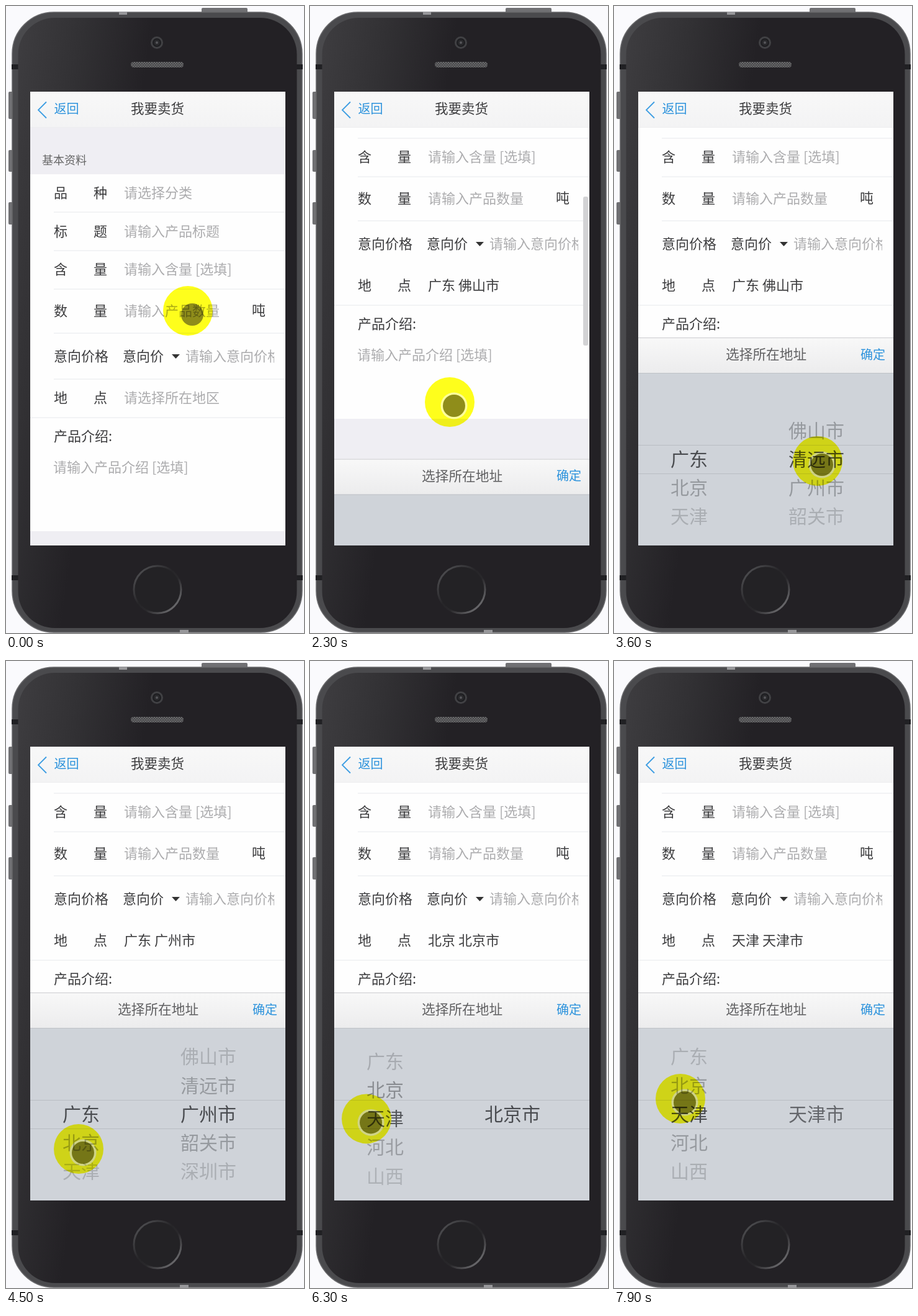
Write an HTML page that moves like this. It is 480 by 1010 pixels and loops after 8000 ms.

```html
<!DOCTYPE html>
<html lang="zh-CN">
<head>
<meta charset="utf-8">
<title>我要卖货</title>
<style>
html, body { margin: 0; width: 100%; height: 100%; overflow: hidden; background: #fafafd; }
svg { display: block; width: 480px; height: 1010px; }
text { font: 300 22px "Noto Sans CJK SC", "Noto Sans CJK", sans-serif; fill: #3c3c3e; white-space: pre; }
.hint { fill: #acacae; }
.blue { fill: #2b92dc; }
.rule { stroke: #e6e8ec; }
#wheels text { fill: #4a4c50; }
#touch { mix-blend-mode: multiply; }
</style>
</head>
<body>
<svg viewBox="0 0 480 1010">
  <defs>
    <linearGradient id="body" x1="0" y1="0.06" x2="0.42" y2="0.2">
      <stop offset="0" stop-color="#3d3c3f"/><stop offset="0.45" stop-color="#323134"/><stop offset="1" stop-color="#232125"/>
    </linearGradient>
    <linearGradient id="nav" x2="0" y2="1">
      <stop offset="0" stop-color="#f8f8f8"/><stop offset="1" stop-color="#f3f3f4"/>
    </linearGradient>
    <linearGradient id="bar" x2="0" y2="1">
      <stop offset="0" stop-color="#f8f8f8"/><stop offset="1" stop-color="#ececed"/>
    </linearGradient>
    <linearGradient id="home" x2="1" y2="1">
      <stop offset="0" stop-color="#59595c"/><stop offset="0.45" stop-color="#262528"/>
      <stop offset="0.6" stop-color="#29282b"/><stop offset="1" stop-color="#88888b"/>
    </linearGradient>
    <pattern id="mesh" width="4" height="4" patternUnits="userSpaceOnUse">
      <path fill="#6a6a6c" d="M0 0h2v2H0zM2 2h2v2H2z"/>
    </pattern>
    <clipPath id="page"><path d="M39 196H450V869H39z"/></clipPath>
    <clipPath id="screen"><path d="M39 138H450V869H39z"/></clipPath>
    <clipPath id="field"><path d="M288 540H432V590H288z"/></clipPath>
    <clipPath id="drum"><path d="M39 592H450V869H39z"/></clipPath>
  </defs>

  <!-- phone -->
  <g fill="#707073">
    <rect x="315" y="3" width="74" height="10" rx="2"/>
    <rect x="4" y="138" width="8" height="44" rx="2"/>
    <rect x="4" y="232" width="8" height="35" rx="2"/>
    <rect x="4" y="316" width="8" height="36" rx="2"/>
  </g>
  <rect x="10" y="10" width="467" height="999" rx="67" fill="#4a4a4d" stroke="#68686b" stroke-width="1.5"/>
  <path fill="#202023" d="M9 94h11v8H9zM467 94h11v8h-11zM9 917h11v8H9zM467 917h11v8h-11z"/>
  <path fill="#98989b" d="M182 9h13v5h-13zM280 1005h14v5h-14z"/>
  <rect x="19.500" y="19" width="449" height="983" rx="59" fill="url(#body)"/>
  <circle cx="243" cy="59" r="10" fill="#414144"/>
  <circle cx="243" cy="59" r="6" fill="#29292c" stroke="#1d1d20" stroke-width="2"/>
  <circle cx="243" cy="59" r="2" fill="#57575b"/>
  <rect x="201" y="90" width="85" height="9" rx="4.500" fill="#454547"/>
  <rect x="201" y="90" width="85" height="9" rx="4.500" fill="url(#mesh)"/>
  <circle cx="244" cy="940" r="38" fill="#232225" stroke="url(#home)" stroke-width="3"/>

  <!-- form page -->
  <path fill="#fff" d="M39 138H450V869H39z"/>
  <g clip-path="url(#page)">
    <g id="form">
      <path fill="#efeef3" d="M39 196H450V271H39zM39 846H450V1060H39z"/>
      <path fill="#fefefe" d="M39 271H450V846H39z"/>
      <path class="rule" d="M77 332H450M77 394H450M77 456H450M77 527H450M39 663H450"/>
      <path class="rule" id="priceRule" d="M77 601H450"/>
      <path fill="#333" d="M267 561h13l-6.500 7z"/>
      <g id="copy"></g>
      <g clip-path="url(#field)" id="price"></g>
    </g>
    <rect id="scroll" x="440" y="307" width="8" height="240" rx="3" fill="#d3d3d5"/>
  </g>
  <path fill="url(#nav)" d="M39 138H450V196H39z"/>
  <path stroke="#ededef" d="M39 195.500H450"/>
  <path fill="none" stroke="#3c9de2" stroke-width="1.800" d="M65 154.500 52 167.500 65 180.500"/>
  <g id="title"></g>

  <!-- picker -->
  <g clip-path="url(#screen)">
    <g id="picker">
      <path fill="#cfd3d9" d="M39 591H450V872H39z"/>
      <path fill="url(#bar)" d="M39 534H450V591H39z"/>
      <path stroke="#cbccd0" d="M39 534.500H450"/>
      <path stroke="#bfc2c7" d="M39 591.500H450"/>
      <path stroke="#b9bdc3" d="M39 707.500H450M39 753.500H450"/>
      <g id="head"></g>
      <g clip-path="url(#drum)"><g id="wheels"></g></g>
    </g>
  </g>

  <g id="touch">
    <circle r="40" fill="#ffff1c"/>
    <circle id="ring" cx="7" cy="6" r="21.500" fill="#ffff9c"/>
    <circle cx="7" cy="6" r="18" fill="#908e1a"/>
  </g>
</svg>
<script>
const LOOP = 8000, STEP = 46.3, MID = 729.5;
const $ = id => document.getElementById(id);

// Text is placed by its left edge (or middle) and its vertical centre.
function write(parent, str, x, cy, { size = 22, cls = '', middle = false } = {}) {
  const el = document.createElementNS('http://www.w3.org/2000/svg', 'text');
  el.textContent = str;
  el.setAttribute('x', x);
  el.setAttribute('y', cy + size * 0.38);
  el.setAttribute('class', cls);
  el.style.fontSize = size + 'px';
  if (middle) el.style.textAnchor = 'middle';
  $(parent).append(el);
  return el;
}

const hint = { cls: 'hint' };
write('title', '返回', 77.5, 165, { size: 20, cls: 'blue' });
write('title', '我要卖货', 201, 165, { size: 21.5 });
write('copy', '基本资料', 58, 248, { size: 18 }).style.fill = '#666';
[['品', '种', 301, '请选择分类'], ['标', '题', 363, '请输入产品标题'],
 ['含', '量', 424, '请输入含量 [选填]'], ['数', '量', 491, '请输入产品数量'],
 ['地', '点', 631, '']].forEach(([a, b, y, tip]) => {
  write('copy', a, 77, y);
  write('copy', b, 141, y);
  write('copy', tip, 190, y, hint);
});
write('copy', '吨', 396, 490);
write('copy', '意向价格', 77, 564);
write('copy', '意向价', 188, 564);
write('price', '请输入意向价格', 289, 564, hint);
write('copy', '产品介绍:', 77, 693);
write('copy', '请输入产品介绍 [选填]', 76, 743, hint);
const place = write('copy', '', 190, 631);
write('head', '选择所在地址', 180, 561, { size: 21.7 }).style.fill = '#606062';
write('head', '确定', 397, 561, { size: 20, cls: 'blue' });

const provinces = ['广东', '北京', '天津', '河北', '山西', '内蒙古', '辽宁'];
const cities = [
  ['佛山市', '清远市', '广州市', '韶关市', '深圳市', '珠海市'],
  ['北京市'], ['天津市'], ['石家庄市', '唐山市', '秦皇岛市', '邯郸市']
];
const column = (n, x) => Array.from({ length: n }, () =>
  write('wheels', '', x, MID, { size: 30, middle: true }));
const left = column(provinces.length, 121), right = column(6, 326);

// Keys: [time, value, ...]; each stretch is eased at both ends.
const provinceKeys = [[0, 0], [5000, 0], [5400, 1], [6000, 1], [6400, 2], [6650, 2], [6900, 3], [7580, 3], [7800, 2]];
const cityKeys = [[0, 0], [3350, 0], [3850, 2]];
const touchKeys = [
  [0, 293, 491], [300, 292, 491], [900, 240, 600], [1100, 246, 590], [1500, 231, 560],
  [1800, 222, 642], [1900, 225, 638], [3000, 225, 638], [3350, 326, 778], [3850, 330, 688],
  [4000, 325, 690], [4500, 117, 786], [5000, 117, 786], [5400, 108, 742], [5500, 106, 747],
  [5900, 93, 805], [6350, 91, 735], [6650, 86, 790], [6950, 116, 732], [7100, 116, 737],
  [7550, 106, 662], [7900, 107, 705]
];
// Settled choices: [time, province, city]
const picks = [[2200, 0, 0], [3850, 0, 2], [5400, 1, 0], [6400, 2, 0], [6900, 3, 0], [7800, 2, 0]];

function track(keys, t) {
  const i = keys.findIndex(k => k[0] > t);
  if (i < 0) return keys[keys.length - 1].slice(1);
  const a = keys[i - 1], b = keys[i];
  const p = (t - a[0]) / (b[0] - a[0]), e = p * p * (3 - 2 * p);
  return a.slice(1).map((v, n) => v + (b[n + 1] - v) * e);
}

function spin(nodes, names, pos, alpha = 1) {
  nodes.forEach((el, i) => {
    const d = i - pos, far = Math.abs(d);
    const shade = far < 1 ? 1 - 0.58 * far : Math.max(0, 0.42 - 0.15 * (far - 1));
    el.textContent = names[i] || '';
    el.setAttribute('transform', `translate(0 ${d * STEP})`);
    el.setAttribute('opacity', far > 2.6 ? 0 : shade * alpha);
  });
}

function draw(t) {
  const open = t >= 2200, scrolled = t >= 2300;
  const [x, y] = track(touchKeys, t);
  $('touch').setAttribute('transform', `translate(${x} ${y})`);
  $('ring').setAttribute('opacity', t < 300 ? 0 : 1);
  $('form').setAttribute('transform', `translate(0 ${scrolled ? -181 : 0})`);
  $('priceRule').setAttribute('opacity', scrolled ? 0 : 1);
  $('scroll').setAttribute('opacity', scrolled ? Math.min(1, Math.max(0, (3400 - t) / 300)) : 0);

  const rest = open ? Math.max(0, 1 - (t - 2200) / 600) : 1;
  $('picker').setAttribute('transform', `translate(0 ${338 * rest ** 3})`);

  const [since, p, c] = picks.filter(k => k[0] <= t).pop() || picks[0];
  place.textContent = scrolled ? provinces[p] + ' ' + cities[p][c] : '请选择所在地区';
  place.setAttribute('class', scrolled ? '' : 'hint');
  spin(left, provinces, track(provinceKeys, t)[0]);
  const fresh = p ? Math.min(1, 0.6 + (t - since) / 500) : 1;
  spin(right, cities[p], p ? 0 : track(cityKeys, t)[0], fresh);
}

function tick() {
  draw(Math.floor(performance.now() % LOOP / 100) * 100);
  requestAnimationFrame(tick);
}
tick();
</script>
</body>
</html>
```
